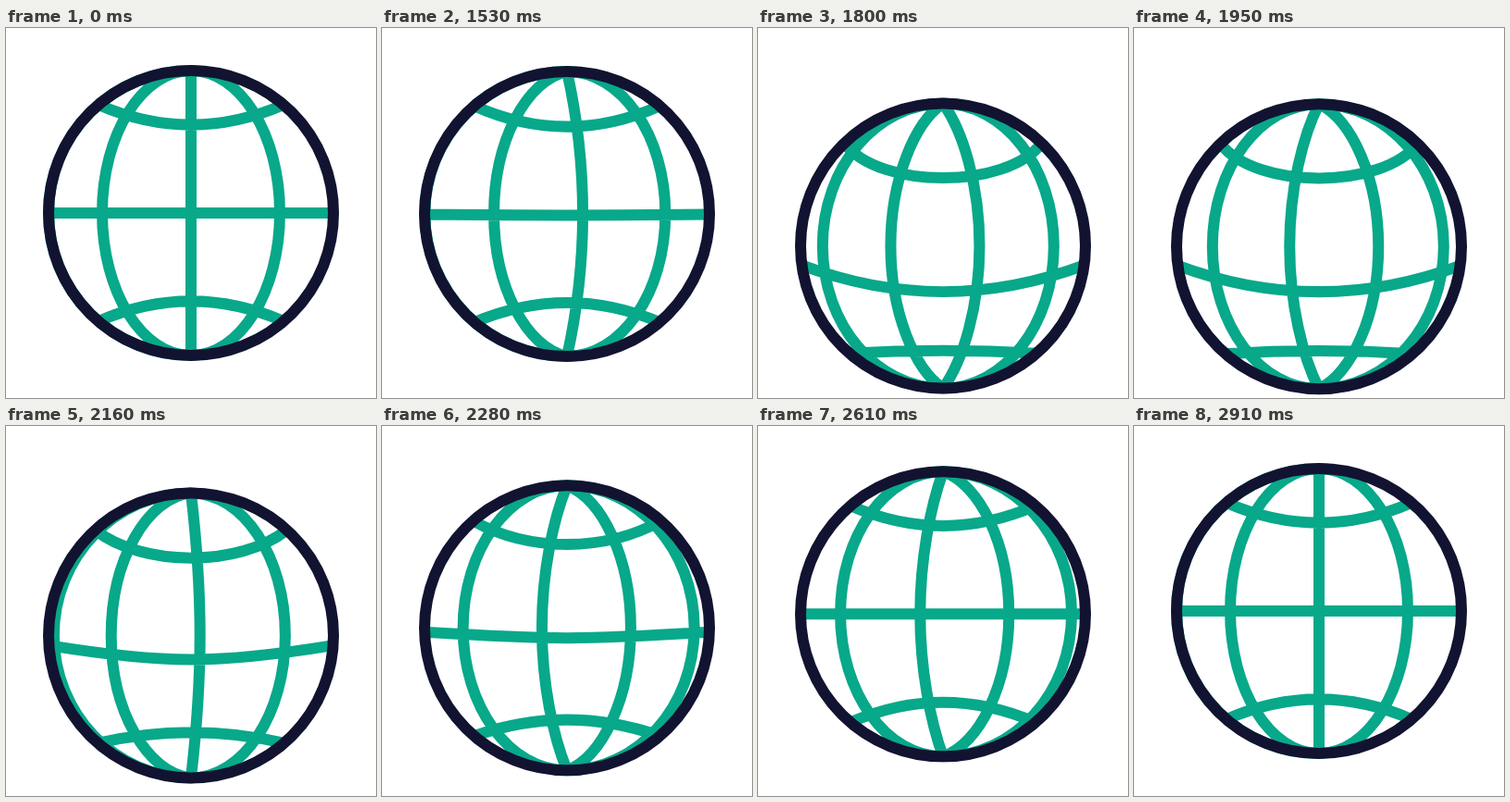
These frames come from a looping animation (400x400 px, 2.94 s). An HTML page:

```html
<!DOCTYPE html>
<html lang="en">
<head>
<meta charset="utf-8">
<title>Spinning globe</title>
<style>
  html, body { margin: 0; width: 100%; height: 100%; overflow: hidden; background: #fff; }
  svg { display: block; width: 100vw; height: 100vh; }
  path, circle { fill: none; stroke-width: 12; }
  path { stroke: #08a88a; }
  circle { stroke: #121331; }
</style>
</head>
<body>
<svg viewBox="0 0 400 400">
  <g id="globe" transform="translate(200 200)">
    <path id="lines"/>
    <circle r="154"/>
  </g>
</svg>
<script>
const LOOP = 2940, STEP = 30, R = 154, INNER = 96, TURNS = 7, DROP = 36.8;
const ROUND = 0.552; // handle length of a quarter ellipse
const globe = document.getElementById('globe');
const lines = document.getElementById('lines');

const mix = (a, b, p) => a + (b - a) * p;

// Cubic-bezier easing between two times, solved by bisection.
function ease(from, to, x1, y1, x2, y2) {
  const curve = (a, b, u) => 3 * (1 - u) ** 2 * u * a + 3 * (1 - u) * u * u * b + u ** 3;
  return t => {
    const x = (t - from) / (to - from);
    if (x <= 0) return 0;
    if (x >= 1) return 1;
    let lo = 0, hi = 1;
    for (let i = 0; i < 30; i++) {
      const mid = (lo + hi) / 2;
      if (curve(x1, x2, mid) < x) lo = mid; else hi = mid;
    }
    return curve(y1, y2, lo);
  };
}

const fall = ease(1500, 1880, .29, 0, .28, 1);
const rise = ease(1880, 2900, .3, 0, .41, 1);
const level = ease(1880, 2450, .333, 0, .667, 1);
const spin = ease(1503, 2910, .236, .3, .435, 1);

// Each meridian slides to the next stop during one turn.
const stops = [-R, -INNER, 0, INNER, R];

// Parallels: [half width, end y, handle x, handle y], level and tilted.
const parallels = [
  [[100, -117, 33, -88], [107, -111, 70, -60]],
  [[154, 0, 0, 0], [154, 21, 54, 61]],
  [[100, 117, 33, 88], [102, 116, 34, 113]]
];

// Morphs from a straight line at the centre to a full ellipse further out.
function meridian(x) {
  const straight = Math.max(0, 1 - Math.abs(x) / INNER);
  const pole = R * (1 - straight / 3);
  const side = R * mix(ROUND, 1 / 3, straight);
  const h = x * ROUND;
  return `M0 ${-R}C${h} ${-pole} ${x} ${-side} ${x} 0S${h} ${pole} 0 ${R}`;
}

function parallel([flat, tilted], tilt) {
  const [w, y, hx, hy] = flat.map((v, i) => mix(v, tilted[i], tilt));
  return `M${-w} ${y}C${-hx} ${hy} ${hx} ${hy} ${w} ${y}`;
}

function draw(t) {
  const down = fall(t);
  const tilt = down * (1 - level(t));
  const turn = spin(t) * TURNS;
  const phase = turn % 1;
  const parts = parallels.map(p => parallel(p, tilt));
  for (let i = 0; i < 4; i++) {
    // The first meridian to come in leaves the rim late.
    const p = i === 0 && turn < 1 ? phase ** 3 : phase;
    parts.push(meridian(mix(stops[i], stops[i + 1], p)));
  }
  lines.setAttribute('d', parts.join(''));
  globe.setAttribute('transform', `translate(200 ${200 + DROP * down * (1 - rise(t))})`);
}

const start = performance.now();
function tick() {
  const t = (performance.now() - start) % LOOP;
  draw(Math.floor(t / STEP) * STEP);
  requestAnimationFrame(tick);
}
tick();
</script>
</body>
</html>
```
